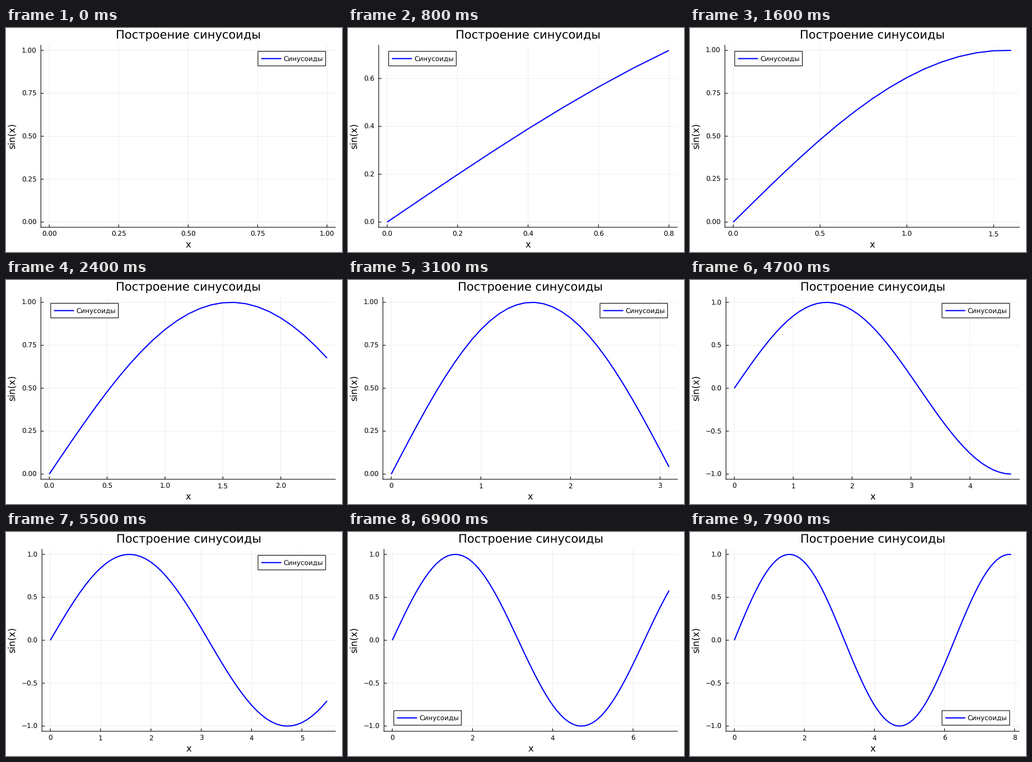
A matplotlib script that plays this animation: 600x400 px, repeating every 8000 ms.

```python
import numpy as np
import matplotlib.pyplot as plt
from matplotlib.animation import FuncAnimation
from matplotlib.patches import Rectangle
from matplotlib.textpath import TextPath

W, H, DPI = 600, 400, 100
FRAMES, INTERVAL = 80, 100
TOP, BOTTOM, RIGHT = 30.8, 355.8, 588.2
PAD = 0.03
TICK = 5
LEGEND_W, LEGEND_H = 120.7, 26
BLUE, GRID = "#0000ff", "#e6e6e6"
SMALL, GUIDE, TITLE = 12, 16.5, 21

# mantissa of a tick step and how nice it is
NICE = [(1, 1.0), (5, 0.9), (2, 0.7), (2.5, 0.5), (3, 0.2)]

plt.rcParams.update({"font.family": "DejaVu Sans", "text.hinting": "none"})


def px(size):
    return size * 72 / DPI


def best_ticks(lo, hi):
    """Pick evenly spaced ticks by granularity, coverage and niceness."""
    span = hi - lo
    top = int(np.ceil(np.log10(span)))
    best, best_score = None, -np.inf
    for z in (top, top - 1, top - 2):
        options = []
        for order, (q, nice) in enumerate(NICE):
            step = q * 10.0 ** z
            outer = np.ceil(hi / step) - np.floor(lo / step)
            options.append((outer, order, step, nice))
        for _, _, step, nice in sorted(options):
            first = int(np.ceil(lo / step - 1e-9))
            last = int(np.floor(hi / step + 1e-9))
            n = last - first + 1
            if not 4 <= n <= 8:
                continue
            score = (1 - abs(n - 5) / 5) / 4 + nice / 4
            score += 0.5 * span / ((n - 1) * step)
            if score > best_score + 1e-9:
                best_score = score
                best = step, np.arange(first, last + 1) * step
    return best


def labelled_ticks(lo, hi):
    step, values = best_ticks(lo, hi)
    digits = 0
    while abs(step * 10 ** digits - round(step * 10 ** digits)) > 1e-6:
        digits += 1
    return [(v, f"{v + 0.0:.{digits}f}".replace("-", "−")) for v in values]


def ink_width(s):
    return TextPath((0, 0), s, size=SMALL).get_extents().width


def widen(lo, hi):
    margin = PAD * (hi - lo)
    return lo - margin, hi + margin


def legend_corner(u, v):
    """Emptiest corner as (right, top); the top right wins ties."""
    def crowd(corner):
        right, top = corner
        in_x = u > 0.75 if right else u < 0.25
        in_y = v > 0.75 if top else v < 0.25
        return np.sum(in_x & in_y)
    return min([(1, 1), (0, 1), (1, 0), (0, 0)], key=crowd)


fig = plt.figure(figsize=(W / DPI, H / DPI), dpi=DPI, facecolor="white")
ax = fig.add_axes([0, 0, 1, 1])


def line(xs, ys, color="black", width=1.1, z=2, cap="butt"):
    ax.plot(xs, ys, color=color, lw=px(width), zorder=z, snap=False,
            solid_capstyle=cap, solid_joinstyle="round")


def text(x, y, s, size=SMALL, ha="center", **kw):
    ax.text(x, y, s, fontsize=px(size), ha=ha, va="baseline", zorder=6, **kw)


def draw_legend(left, corner):
    right, top = corner
    gap_x, gap_y = (RIGHT - left) / 30, (BOTTOM - TOP) / 30
    x = RIGHT - gap_x - LEGEND_W if right else left + gap_x
    y = TOP + gap_y if top else BOTTOM - gap_y - LEGEND_H
    mid = y + LEGEND_H / 2
    ax.add_patch(Rectangle((x, y), LEGEND_W, LEGEND_H, fc="white",
                           ec="black", lw=px(1.1), zorder=4, snap=False))
    line([x + 5.8, x + 41.6], [mid, mid], BLUE, 2.1, 5)
    text(x + 45.7, mid + 4.4, "Синусоиды", ha="left")


def draw(i):
    ax.clear()
    ax.set_xlim(0, W)
    ax.set_ylim(H, 0)
    ax.axis("off")

    xs = np.arange(i + 1) * 0.1
    ys = np.sin(xs)
    x0, x1 = widen(0, xs[-1] if i else 1)
    y0, y1 = widen(ys.min(), ys.max() if i else 1)
    x_ticks, y_ticks = labelled_ticks(x0, x1), labelled_ticks(y0, y1)

    # the left margin follows the widest label
    left = 37.2 + max(ink_width(s) for _, s in y_ticks)
    mid_x, mid_y = (left + RIGHT) / 2, (TOP + BOTTOM) / 2

    def to_x(v):
        return left + (v - x0) / (x1 - x0) * (RIGHT - left)

    def to_y(v):
        return BOTTOM - (v - y0) / (y1 - y0) * (BOTTOM - TOP)

    for v, s in x_ticks:
        x = to_x(v)
        line([x, x], [TOP, BOTTOM], GRID, 0.7, 1)
        line([x, x], [BOTTOM, BOTTOM - TICK])
        text(x, 371.6, s)
    for v, s in y_ticks:
        y = to_y(v)
        line([left, RIGHT], [y, y], GRID, 0.7, 1)
        line([left, left + TICK], [y, y])
        text(left - 7.7, y + 4.4, s, ha="right")

    line([left, RIGHT], [BOTTOM, BOTTOM], cap="projecting")
    line([left, left], [TOP, BOTTOM], cap="projecting")
    if i:
        line(to_x(xs), to_y(ys), BLUE, 2.1, 3)
    draw_legend(left, legend_corner((xs - x0) / (x1 - x0),
                                    (ys - y0) / (y1 - y0)))

    text(mid_x, 18.6, "Построение синусоиды", TITLE)
    text(mid_x, 391.6, "x", GUIDE)
    text(16.7, mid_y, "sin(x)", GUIDE, rotation=90, rotation_mode="anchor")
    return []


anim = FuncAnimation(fig, draw, frames=FRAMES, interval=INTERVAL,
                     repeat=True, repeat_delay=0)
plt.show()
```
